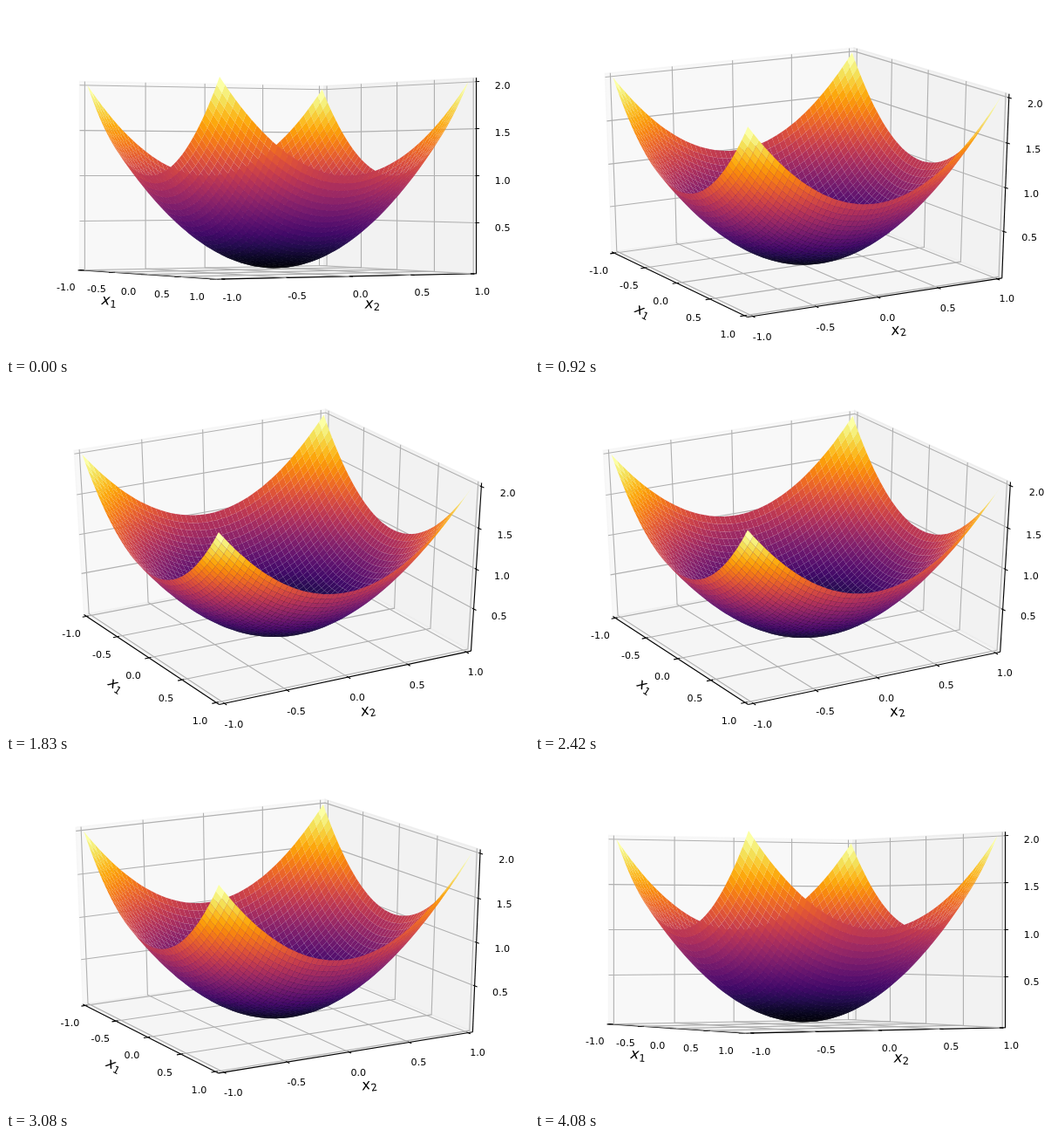
An HTML page with a canvas that plays this animation: 600 px wide and 400 px high, repeating every 4.16 s.

```html
<!DOCTYPE html>
<html lang="en">
<head>
<meta charset="utf-8">
<title>Paraboloid under a tilting view</title>
<style>
  html, body { margin: 0; width: 100%; height: 100%; overflow: hidden; background: #fff; }
  canvas, svg { position: absolute; left: 0; top: 0; width: 600px; height: 400px; }
  text { font: 11.11px "DejaVu Sans", sans-serif; text-anchor: middle; fill: #000; }
  .name { font-size: 16.67px; }
  .var { font-style: italic; }
  .sub { font-size: 11.67px; }
</style>
</head>
<body>
<canvas id="plot" width="600" height="400"></canvas>
<svg id="labels" viewBox="0 0 600 400"></svg>
<script>
const ctx = document.getElementById('plot').getContext('2d');
const svg = document.getElementById('labels');
const LOOP = 4160, FRAMES = 50;

// Inferno colour map in equal steps
const INFERNO = ('000004 0c0826 240c4f 420a68 5d126e 781c6d 932667 ae305c ' +
  'c73e4c dd513a ed6925 f8850f fca50a fac62d f2e661 fcffa4').split(' ')
  .map(h => [0, 2, 4].map(i => parseInt(h.slice(i, i + 2), 16)));

function inferno(t) {
  const s = t * (INFERNO.length - 1);
  const i = Math.min(Math.floor(s), INFERNO.length - 2);
  const rgb = INFERNO[i].map((c, k) => Math.round(c + (INFERNO[i + 1][k] - c) * (s - i)));
  return `rgb(${rgb})`;
}

// Surface z = x1² + x2² inside a unit cube centred on the origin
const N = 50;
const grid = Array.from({ length: N }, (_, i) => -1 + 2 * i / (N - 1));
const zMin = 2 / (N - 1) ** 2;
const unitZ = z => (z - zMin) / (2 - zMin) - 0.5;
const verts = grid.flatMap(y => grid.map(x => [x / 2, y / 2, unitZ(x * x + y * y)]));

const faces = [];
for (let r = 0; r < N - 1; r++) {
  for (let c = 0; c < N - 1; c++) {
    const a = r * N + c;
    const ids = [a, a + 1, a + N + 1, a + N];
    faces.push({ ids, z: ids.reduce((s, i) => s + verts[i][2], 0) / 4 });
  }
}
const low = Math.min(...faces.map(f => f.z));
const high = Math.max(...faces.map(f => f.z));
for (const f of faces) f.color = inferno((f.z - low) / (high - low));

// Distances from the centre: box edge, tick ends, tick labels, axis names
const E = 0.5 * 25 / 24, OUT = E + 1 / 60, IN = E - 1 / 120, TL = 0.586, AL = 0.6621;
const HALVES = [-1, -0.5, 0, 0.5, 1];

const axes = [
  {
    ticks: HALVES.map(v => [v, v / 2]),
    line: [[-E, -E, -E], [E, -E, -E]],
    grid: t => [[t, -E, -E], [t, E, -E], [t, E, E]],
    tick: t => [[t, -OUT, -E], [t, -IN, -E]],
    label: t => [t, -TL, -TL],
    name: '1', at: [0, -AL, -AL]
  },
  {
    ticks: HALVES.map(v => [v, v / 2]),
    line: [[E, -E, -E], [E, E, -E]],
    grid: t => [[E, t, -E], [-E, t, -E], [-E, t, E]],
    tick: t => [[OUT, t, -E], [IN, t, -E]],
    label: t => [TL, t, -TL],
    name: '2', at: [AL, 0, -AL]
  },
  {
    ticks: [0.5, 1, 1.5, 2].map(v => [v, unitZ(v)]),
    line: [[E, E, -E], [E, E, E]],
    grid: t => [[-E, -E, t], [-E, E, t], [E, E, t]],
    tick: t => [[OUT, E, t], [IN, E, t]],
    label: t => [TL, TL, t]
  }
];

const panes = [
  [242, [[-E, -E, -E], [-E, E, -E], [-E, E, E], [-E, -E, E]]],
  [230, [[-E, E, -E], [E, E, -E], [E, E, E], [-E, E, E]]],
  [236, [[-E, -E, -E], [E, -E, -E], [E, E, -E], [-E, E, -E]]]
];

function addText(cls, html) {
  const el = document.createElementNS('http://www.w3.org/2000/svg', 'text');
  el.setAttribute('class', cls);
  el.innerHTML = html;
  svg.appendChild(el);
  return el;
}
for (const a of axes) {
  a.texts = a.ticks.map(([v]) => addText('', v.toFixed(1)));
  if (a.name) {
    a.title = addText('name',
      `<tspan class="var">x</tspan><tspan class="sub" dy="2.7">${a.name}</tspan>`);
  }
}

// Perspective camera ten units away at azimuth -30°
const AZ = -Math.PI / 6, DIST = 10, BASELINE = 9, LOWEST = 395;
const ca = Math.cos(AZ), sa = Math.sin(AZ);

function camera(elev) {
  const ce = Math.cos(elev), se = Math.sin(elev);
  const view = ([x, y, z]) => {
    const near = x * ca + y * sa;
    const depth = DIST - near * ce - z * se;
    return [(y * ca - x * sa) / depth, (near * se - z * ce) / depth, depth];
  };
  // The plot area shrinks from below to keep the lowest label inside
  const drop = view([TL, -0.5, -TL])[1];
  const over = 194.5 + 2115 * drop + BASELINE - LOWEST;
  const cut = Math.max(0, over / (0.4865 + drop / 0.185));
  const cy = 194.5 - 0.4865 * cut, sy = 2115 - cut / 0.185;
  return p => {
    const [u, v, depth] = view(p);
    return [307.9 + 3200 * u, cy + sy * v, depth];
  };
}

function trace(pts) {
  ctx.beginPath();
  pts.forEach(([x, y], i) => i ? ctx.lineTo(x, y) : ctx.moveTo(x, y));
}

function stroke(pts, color) {
  // Upright lines sit on whole pixels
  if (pts.length === 2 && Math.abs(pts[0][0] - pts[1][0]) < 0.001) {
    const x = Math.floor(pts[0][0]) + 0.5;
    pts = pts.map(p => [x, p[1]]);
  }
  trace(pts);
  ctx.strokeStyle = color;
  ctx.lineWidth = 1.11;
  ctx.stroke();
}

function drawAxis(a, proj) {
  const line = a.line.map(proj);
  stroke(line, '#000');
  for (const [, t] of a.ticks) stroke(a.grid(t).map(proj), '#b0b0b0');
  a.ticks.forEach(([, t], i) => {
    stroke(a.tick(t).map(proj), '#000');
    const [x, y] = proj(a.label(t));
    a.texts[i].setAttribute('x', x.toFixed(2));
    a.texts[i].setAttribute('y', Math.round(y + BASELINE));
  });
  if (a.title) {
    const [[x0, y0], [x1, y1]] = line;
    const angle = Math.atan2(y1 - y0, x1 - x0) * 180 / Math.PI;
    const [x, y] = proj(a.at);
    a.title.setAttribute('transform', `translate(${x} ${y}) rotate(${angle}) translate(0 3.3)`);
  }
}

function drawSurface(proj) {
  const pts = verts.map(proj);
  for (const f of faces) f.depth = f.ids.reduce((s, i) => s + pts[i][2], 0);
  faces.sort((a, b) => b.depth - a.depth);
  for (const f of faces) {
    trace(f.ids.map(i => pts[i]));
    ctx.fillStyle = f.color;
    ctx.fill();
  }
}

function draw(n) {
  const proj = camera(Math.PI / 6 * Math.sin(Math.PI * n / (FRAMES - 1)));
  ctx.fillStyle = '#fff';
  ctx.fillRect(0, 0, 600, 400);
  for (const [g, corners] of panes) {
    trace(corners.map(proj));
    ctx.closePath();
    ctx.fillStyle = ctx.strokeStyle = `rgba(${g},${g},${g},0.5)`;
    ctx.lineWidth = 1.39;
    ctx.fill();
    ctx.stroke();
  }
  for (const a of axes) drawAxis(a, proj);
  drawSurface(proj);
}

// Twelve steps a second, on ten-millisecond marks
const startOf = n => Math.round(n * 25 / 3) * 10;

let shown = -1;
function tick() {
  const t = performance.now() % LOOP;
  let n = FRAMES - 1;
  while (startOf(n) > t) n--;
  if (n !== shown) draw(shown = n);
  requestAnimationFrame(tick);
}
tick();
</script>
</body>
</html>
```
